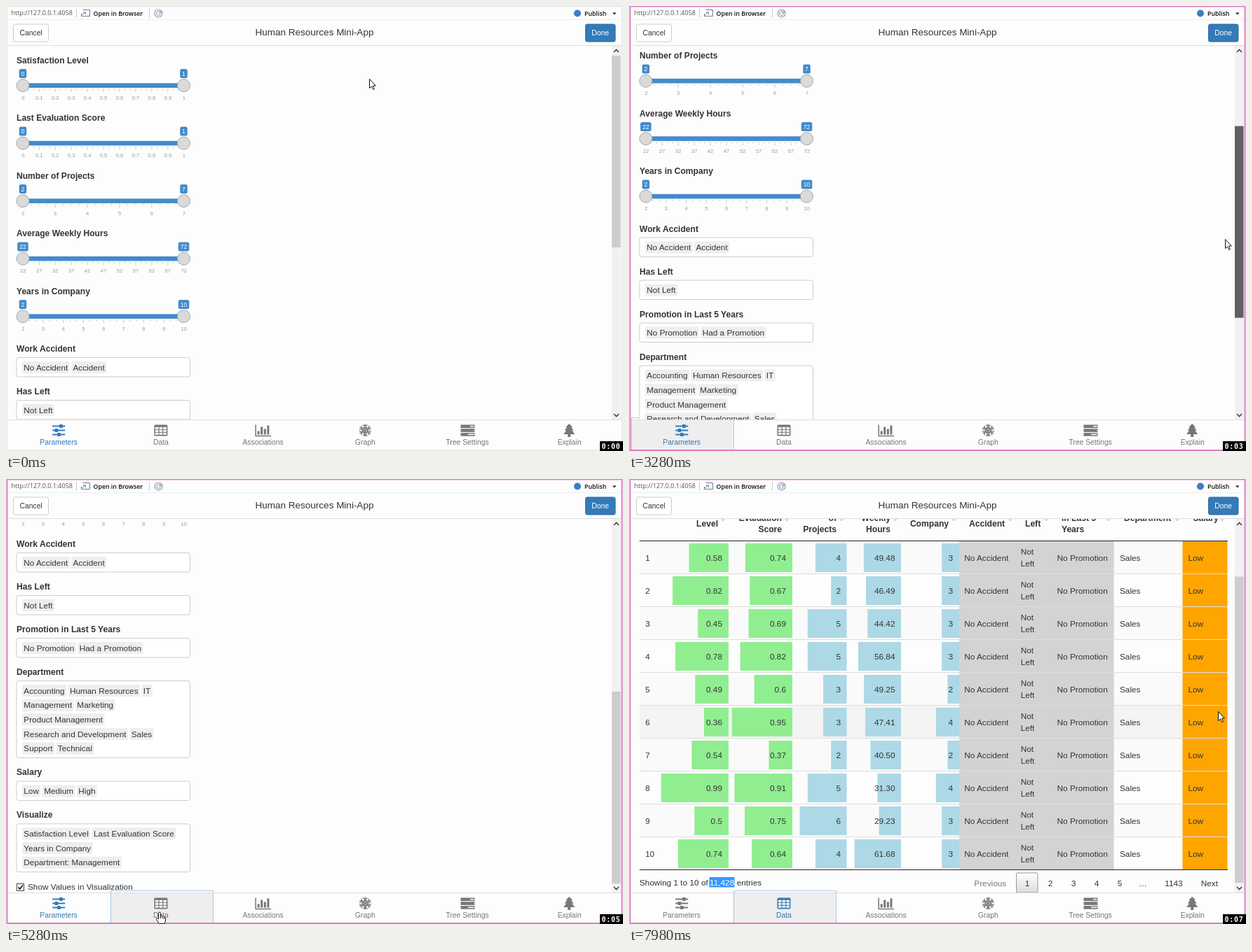
Animation, 880 px wide and 636 px high, one loop 8 s. Source, as an HTML page:

```html
<!DOCTYPE html>
<html lang="en">
<head>
<meta charset="utf-8">
<title>Human Resources Mini-App</title>
<style>
html, body { margin: 0; width: 880px; height: 636px; overflow: hidden; background: #fdfdfd; }
svg { display: block; }
text { font: 11.8px "Liberation Sans", Arial, sans-serif; fill: #333; white-space: pre; }
.b { font-weight: bold; font-size: 12.1px; }
.title { font-size: 13.5px; }
.btn, .tab text { font-size: 10.4px; }
.ui { font: 600 8.8px "Open Sans", sans-serif; fill: #111; }
.url { font: 9px "Open Sans", sans-serif; fill: #555; }
.grid { font-size: 7.6px; fill: #999; }
.badge { font-size: 8.6px; fill: #fff; }
.clock { font: bold 10px "DejaVu Sans Mono", monospace; letter-spacing: .7px; fill: #fff; }
.mute { fill: #777; }
.tab { color: #777; }
.tab.on { color: #337ab7; }
.tab text { fill: currentColor; }
.dots { fill: none; stroke: #5b9fdc; stroke-dasharray: 1 1; }
</style>
</head>
<body>
<svg id="stage" width="880" height="636" viewBox="0 0 880 636">
  <defs>
    <clipPath id="view"><rect x="3" y="57" width="861" height="534"/></clipPath>
    <linearGradient id="page" x2="0" y2="1"><stop stop-color="#fff"/><stop offset="1" stop-color="#dcdcdc"/></linearGradient>
  </defs>
  <rect width="880" height="636" fill="#fdfdfd"/>
  <g clip-path="url(#view)"><g id="form"></g><g id="data"></g></g>

  <rect x="864" y="57" width="13" height="534" fill="#f1f1f1"/>
  <rect id="thumb" x="864" width="12.5"/>
  <path d="M867 66L870.5 62.5L874 66M867 583L870.5 586.5L874 583" fill="none" stroke="#444" stroke-width="1.6"/>

  <path d="M2 19.5H878" stroke="#eee"/>
  <path d="M2 56.5H878M2 591.5H878" stroke="#ddd"/>
  <path d="M100.5 4V17M204.5 4V17" stroke="#ccc"/>
  <text class="url" x="7.5" y="13">http://127.0.0.1:4058</text>
  <path d="M109.500 5.500H119.500V14.500H107.500V11M108 13L113 9M110 9H113.500V12" fill="none" stroke="#6b7f95"/>
  <text class="ui" x="124.500" y="13.500">Open in Browser</text>
  <circle cx="217.500" cy="10.500" r="5.500" fill="none" stroke="#8b9aab" stroke-width="1.200"/>
  <path d="M220 8.500A3 3 0 1 0 220.500 11.500M221 7V10H218" fill="none" stroke="#6d8299"/>
  <circle cx="815" cy="10.500" r="5" fill="#3a7fc4"/>
  <text class="ui" x="825" y="14">Publish</text>
  <path d="M865 9.500H870.500L867.750 12.500Z" fill="#222"/>

  <rect x="10.500" y="26" width="50" height="25" rx="2.500" fill="#fff" stroke="#ccc"/>
  <text class="btn" x="35.700" y="42" text-anchor="middle">Cancel</text>
  <text class="title" x="440" y="42" text-anchor="middle">Human Resources Mini-App</text>
  <rect x="826.500" y="26" width="42.500" height="25" rx="2.500" fill="#337ab7" stroke="#2e6da4"/>
  <text class="btn" x="847.700" y="42" text-anchor="middle" style="fill:#fff">Done</text>

  <rect id="focus" y="592" width="146" height="42" fill="#eee"/>
  <g id="tabs"></g>
  <path id="dots" class="dots"/>
  <rect id="frame" x="1.500" y=".5" width="877" height="634.500" fill="none"/>
  <rect x="847" y="622" width="33" height="14"/>
  <text id="clock" class="clock" x="849.500" y="632.500"></text>
  <g id="cursor" fill="#fff" stroke="#111" stroke-linejoin="round">
    <path id="arrow" d="M.5 .5V13.500L3.500 10.800L5.600 15.500L7.500 14.600L5.500 10H9.300Z"/>
    <path id="hand" d="M-1.500 10V1.500A1.400 1.400 0 0 1 1.400 1.500V6A1.300 1.300 0 0 1 4 6.500A1.300 1.300 0 0 1 6.500 7.200A1.200 1.200 0 0 1 8.500 8.200V12L7 16.500H-.5L-4.500 10.500C-5 8.500 -3 8 -1.500 10ZM1.400 6V9M4 7V9.500M6.500 7.500V10"/>
  </g>
</svg>
<script>
const $ = id => document.getElementById(id);

function el(parent, tag, attrs, content) {
  const e = document.createElementNS("http://www.w3.org/2000/svg", tag);
  for (const k in attrs) e.setAttribute(k, attrs[k]);
  if (content !== undefined) e.textContent = content;
  return parent.appendChild(e);
}
const rect = (p, x, y, width, height, fill, more) => el(p, "rect", { x, y, width, height, fill, ...more });
const path = (p, d, more) => el(p, "path", { d, ...more });
const text = (p, s, x, y, cls = "", anchor = "start") =>
  el(p, "text", { x, y, class: cls, "text-anchor": anchor }, s);

// ---- Parameters pane ----
const form = $("form"), data = $("data");

function slider(i, name, labels, minor) {
  const g = el(form, "g", { transform: `translate(0 ${82.5 * i})` });
  const n = labels.length - 1, gap = 229.5 / n;
  text(g, name, 15, 81.5, "b");
  let big = "", small = "";
  labels.forEach((s, k) => {
    const x = 24.3 + k * gap;
    big += `M${x} 118V123`;
    if (k < n) for (let m = 1; m <= minor; m++) small += `M${x + gap * m / (minor + 1)} 118V120.5`;
    text(g, s, x, 133.5, "grid", "middle");
  });
  path(g, big, { stroke: "#a9bfd2", "stroke-width": .8 });
  path(g, small, { stroke: "#a9bfd2", "stroke-width": .8 });
  rect(g, 24, 110.3, 230, 6.6, "#428bca");
  for (const [x, s] of [[24, labels[0]], [253.5, labels[n]]]) {
    el(g, "circle", { cx: x, cy: 113.6, r: 9, fill: "#dadada", stroke: "#a8a8a8" });
    const w = s.length > 1 ? 15.5 : 10.5;
    rect(g, x - w / 2, 90, w, 13, "#428bca", { rx: 2.5 });
    text(g, s, x, 99.7, "badge", "middle");
  }
}
const range = (from, step, n) => Array.from({ length: n }, (_, i) => String(+(from + step * i).toFixed(1)));
slider(0, "Satisfaction Level", range(0, .1, 11), 2);
slider(1, "Last Evaluation Score", range(0, .1, 11), 2);
slider(2, "Number of Projects", range(2, 1, 6), 3);
slider(3, "Average Weekly Hours", range(22, 5, 11), 2);
slider(4, "Years in Company", range(2, 1, 9), 2);

let top_ = 502.5;
function picker(name, ...lines) {
  const h = 27.5 + 20.6 * (lines.length - 1);
  text(form, name, 15, top_ - 8.5, "b");
  rect(form, 15, top_, 247.5, h, "#fff", { rx: 3, stroke: "#ccc" });
  lines.forEach((line, i) => {
    let x = 23;
    const y = top_ + 18.3 + 20.6 * i;
    for (const s of line.split("|")) {
      const box = rect(form, x, y - 12.7, 10, 17, "#eee", { rx: 2 });
      const w = text(form, s, x + 2.3, y).getComputedTextLength() + 4.6;
      box.setAttribute("width", w);
      x += w + 2.6;
    }
  });
  top_ += h + 33.5;
}
picker("Work Accident", "No Accident|Accident");
picker("Has Left", "Not Left");
picker("Promotion in Last 5 Years", "No Promotion|Had a Promotion");
picker("Department", "Accounting|Human Resources|IT", "Management|Marketing", "Product Management",
  "Research and Development|Sales", "Support|Technical");
picker("Salary", "Low|Medium|High");
picker("Visualize", "Satisfaction Level|Last Evaluation Score", "Years in Company", "Department: Management");
rect(form, 15.5, 975.5, 10, 10, "#fff", { stroke: "#444" });
path(form, "M17.5 980.5L19.8 983L23.800 977.500", { fill: "none", stroke: "#111", "stroke-width": 1.6 });
text(form, "Show Values in Visualization", 31, 984.3);

// ---- Data pane ----
const green = "#90ee90", blue = "#add8e6";
const columns = [ // right edge, text right, px per unit, colour
  [142, 133, 97.3, green], [233, 224, 90.7, green], [310.5, 302, 11.15, blue],
  [388, 379.5, 1.075, blue], [471, 462, 8.3, blue]
];
const records = `0.58 0.74 4 49.48 3
0.82 0.67 2 46.49 3
0.45 0.69 5 44.42 3
0.78 0.82 5 56.84 3
0.49 0.6 3 49.25 2
0.36 0.95 3 47.41 4
0.54 0.37 2 40.50 2
0.99 0.91 5 31.30 4
0.5 0.75 6 29.23 3
0.74 0.64 4 61.68 3`.split("\n").map(r => r.split(" "));

for (const [s, x, y] of [["Level", 127, 68], ["Evaluation", 218, 59.5], ["Score", 218, 76], ["of", 296, 59.5],
  ["Projects", 296, 76], ["Weekly", 373, 59.5], ["Hours", 373, 76], ["Company", 456, 68]])
  text(data, s, x, y, "b", "end");
for (const [s, x, y] of [["Accident", 485, 68], ["Left", 565, 68], ["in Last 5", 617, 59.5], ["Years", 617, 76],
  ["Department", 706, 59.5], ["Salary", 804.5, 59.5]])
  text(data, s, x, y, "b");
for (const x of [134, 225, 303, 380, 463, 544, 595, 684, 782, 846])
  path(data, `M${x - 3} 57.500H${x + 3}L${x} 60.500Z`, { fill: "#d0d0d0" });

const rows = records.map((rec, i) => {
  const y = 89 + 47 * i, mid = y + 27.7;
  const back = rect(data, 15, y, 838.5, 47);
  rect(data, 471, y, 220.5, 47, "#d3d3d3");
  rect(data, 789.5, y, 64, 47, "#ffa500");
  if (i < 9) path(data, `M15 ${y + 46.5}H854`, { stroke: "#ddd" });
  text(data, i + 1, 23.3, mid);
  columns.forEach(([right, tx, unit, fill], c) => {
    const w = rec[c] * unit;
    rect(data, right - w, y + 3, w, 41, fill);
    text(data, rec[c], tx, mid, "", "end");
  });
  text(data, "No Accident", 478.3, mid);
  text(data, "Not", 558.7, y + 19.3);
  text(data, "Left", 558.7, y + 35.8);
  text(data, "No Promotion", 610.6, mid);
  text(data, "Sales", 700, mid);
  text(data, "Low", 797.5, mid);
  return back;
});
path(data, "M15 88.500H854M15 558.500H854", { stroke: "#222" });
text(data, "Showing 1 to 10 of", 15, 581);
rect(data, 114.5, 569, 36, 14.5, "#3399ff");
text(data, "11,428", 115, 581).style.fill = "#fff";
text(data, "entries", 153.7, 581);
rect(data, 552.5, 563, 30.5, 28, "url(#page)", { stroke: "#979797", rx: 1.5 });
text(data, "Previous", 492.3, 581.5, "mute");
["1", "2", "3", "4", "5", "…"].forEach((s, i) => text(data, s, 568 + 33 * i, 581.5, "", "middle"));
text(data, "1143", 777, 581.5, "", "middle");
text(data, "Next", 815.7, 581.5);

// ---- Tab bar; icons are centred on 0,0 ----
const line = (g, d, w) => path(g, d, { fill: "none", stroke: "currentColor", "stroke-width": w });
const block = (g, x, y, w, h, fill = "currentColor") => rect(g, x, y, w, h, fill);
const icons = {
  Parameters(g) {
    [[-6, 2], [0, -4.500], [6, -1]].forEach(([y, x]) => {
      line(g, `M-9 ${y}H9`, 2);
      block(g, x - 1, y - 2.5, 4.5, 5);
    });
  },
  Data(g) {
    rect(g, -9.5, -8, 19, 16, "currentColor", { rx: 1.5 });
    for (let i = 0; i < 9; i++) block(g, -8 + 5.7 * (i % 3), -4.7 + 4 * (i / 3 | 0), 4.6, 3, "#f6f6f6");
  },
  Associations(g) {
    line(g, "M-10.500 -8V8H11.500", 1.5);
    [5, 11, 8, 13].forEach((h, i) => block(g, -8 + 4.6 * i, 6 - h, 3, h));
  },
  Graph(g) {
    for (let a = 0; a < 360; a += 60)
      line(g, "M0 0V-9M-3 -8L0 -5.200L3 -8M-2.500 -4.500L0 -2.500L2.500 -4.500", 1.4)
        .setAttribute("transform", `rotate(${a})`);
  },
  "Tree Settings"(g) {
    [4, 9, 1].forEach((x, i) => {
      block(g, -9.5, -8 + 5.8 * i, 20, 4.6);
      block(g, x, -6.500 + 5.8 * i, 9.5 - x, 1.5, "#fdfdfd");
    });
  },
  Explain(g) {
    path(g, "M-.5 -9.500L4.500 -4.500H2.500L6 0H3.500L7.500 5.500H1.500V9.500H-2.500V5.500H-8.500L-4.500 0H-7L-3.500 -4.500H-5.500Z", { fill: "currentColor" });
  }
};
const tabs = Object.keys(icons).map((name, i) => {
  const x = 75.2 + 145.7 * i;
  const g = el($("tabs"), "g", { class: "tab" });
  icons[name](el(g, "g", { transform: `translate(${x} 606.500)` }));
  text(g, name, x, 627, "", "middle");
  return g;
});

const LOOP = 8000;
const bursts = [[430, 1350, 8], [1490, 1980, 5], [2100, 2370, 3], [2620, 3150, 5], [3280, 3550, 3], [3700, 3700, 1],
  [3850, 4690, 7], [4810, 5160, 4], [5280, 5430, 2], [5710, 6650, 7], [6800, 7830, 9], [7980, 7980, 1]];
const stops = [0];
for (const [a, b, n] of bursts)
  for (let i = 0; i < n; i++) stops.push(n > 1 ? Math.round(a + (b - a) * i / (n - 1)) : a);

const pointer = [[0, 518, 104], [300, 518, 104], [620, 360, 150], [900, 200, 200], [1200, 125, 320], [1350, 116, 380],
  [1600, 200, 420], [1860, 480, 410], [2100, 752, 308], [2370, 852, 226], [2620, 852, 228], [3280, 850, 333],
  [3850, 851, 447], [3990, 851, 474], [4270, 840, 490], [4690, 480, 590], [4930, 225, 619], [5160, 219, 619],
  [5600, 219, 619], [6200, 240, 578], [6650, 222, 566], [7000, 128, 568], [7300, 200, 555], [7600, 480, 460],
  [7830, 759, 361], [7980, 840, 332]];
const scrolling = [[2620, 0], [2750, 20], [3280, 171.5], [3850, 360], [3990, 397]];

function at(keys, t) {
  if (t <= keys[0][0]) return keys[0].slice(1);
  const i = keys.findIndex(k => k[0] > t);
  if (i < 0) return keys[keys.length - 1].slice(1);
  const a = keys[i - 1], b = keys[i], p = (t - a[0]) / (b[0] - a[0]);
  return a.slice(1).map((v, j) => v + (b[j + 1] - v) * p);
}
const set = (id, attrs) => { for (const k in attrs) $(id).setAttribute(k, attrs[k]); };
const show = (id, on) => $(id).setAttribute("visibility", on ? "visible" : "hidden");

function draw(t) {
  const [x, y] = at(pointer, t), [scroll] = at(scrolling, t);
  const table = t >= 5430, clicked = t >= 2620, second = t >= 5280;
  const dragging = clicked && t < 4200;

  show("form", !table);
  show("data", table);
  set("form", { transform: `translate(0 ${-scroll})` });
  set("thumb", table ? { y: 139.5, height: 437.5 } : { y: 71 + scroll / 1.704, height: 274 });
  set("thumb", { fill: dragging ? "#606060" : "#cdcdcd" });

  set("frame", clicked ? { stroke: "#e07cc0", "stroke-width": 2 } : { stroke: "#ddd", "stroke-width": 1 });
  show("focus", clicked);
  show("dots", clicked);
  set("focus", { x: second ? 149 : 3 });
  set("dots", { d: second ? "M149.500 634V588.500H295.500V634" : "M3.500 634V588.500H14M149.500 592V634" });
  tabs.forEach((g, i) => g.classList.toggle("on", i === +table));

  const over = table && x > 15 && x < 854 ? Math.floor((y - 89) / 47) : -1;
  rows.forEach((r, i) => r.setAttribute("fill", i === over ? "#f4f4f4" : i % 2 ? "#fdfdfd" : "#fafafa"));

  const hand = y > 592;
  set("cursor", { transform: `translate(${Math.round(x)} ${Math.round(y)})` });
  show("arrow", !hand);
  show("hand", hand);
  $("clock").textContent = "0:0" + Math.floor(t / 1000);
}

let last = -1;
const start = performance.now();
function tick() {
  const now = (performance.now() - start) % LOOP;
  const t = stops.filter(s => s <= now).pop();
  if (t !== last) draw(last = t);
  requestAnimationFrame(tick);
}
tick();
</script>
</body>
</html>
```
